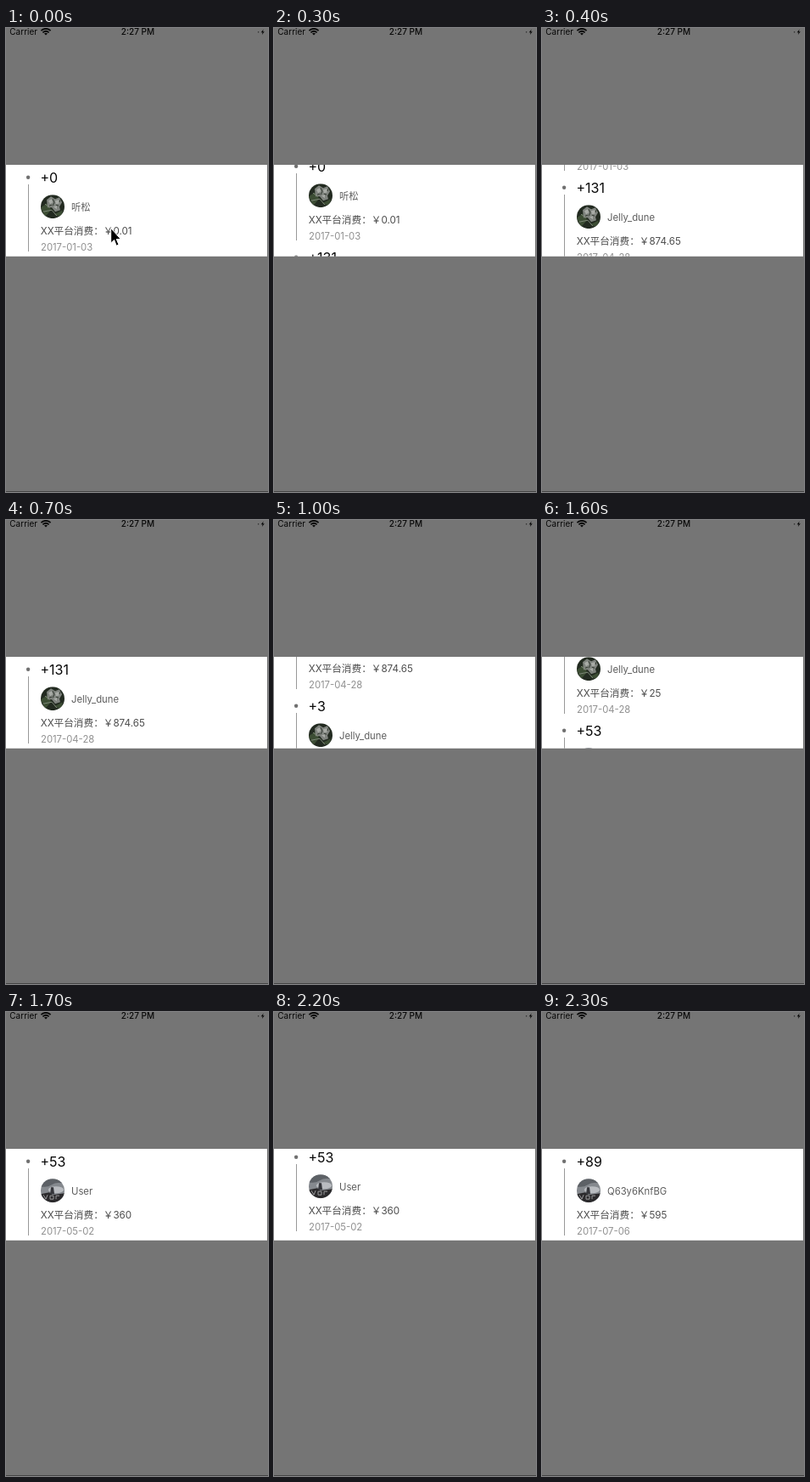
Animation, 309 px wide and 546 px high, one loop 2400 ms. Source, as an HTML page:

```html
<!DOCTYPE html>
<html lang="zh">
<head>
<meta charset="utf-8">
<title>Payment timeline</title>
<style>
  html, body { margin: 0; width: 100%; height: 100%; overflow: hidden; background: #757575; }
  svg { display: block; }
  text { font-family: Inter, "Noto Sans CJK SC", "Noto Sans CJK", sans-serif; white-space: pre; }
  .bar { font-size: 10px; fill: #080808; }
  .points { font-size: 16px; fill: #080808; }
  .name, .date { font-size: 11.3px; }
  .cost { font-size: 11.65px; fill: #4c4c4c; }
  .name { fill: #5c5c5c; }
  .date { fill: #909090; }
</style>
</head>
<body>
<svg width="100%" height="100%" viewBox="0 0 309 546">
  <defs>
    <clipPath id="round"><circle r="14"/></clipPath>
    <clipPath id="card"><rect y="161" width="308" height="107.75"/></clipPath>
    <g id="flower" clip-path="url(#round)">
      <rect x="-14" y="-14" width="28" height="28" fill="#222a20"/>
      <path d="M-14 1L-5-5L-2 4L-9 12ZM2 9L12 4L10 12Z" fill="#3c4d34"/>
      <path d="M-7-8L-2-12L3-9L8-11L11-5L8 0L9 4L3 6L-1 1L-6 1Z" fill="#7f837e"/>
      <path d="M-5-7L-1-9L0-5L-3-3ZM3-7L7-8L8-4L4-3ZM1 0L5-1L5 3Z" fill="#a9aca7"/>
      <path d="M-11 6L-1 4L5 11M-3 1L-9-3" stroke="#7d8778" fill="none"/>
      <path d="M0-9L2-5L0-1M4-2L7-1M-4-1L-1-2M9-8L8-5" stroke="#30372e" fill="none"/>
    </g>
    <g id="sky" clip-path="url(#round)">
      <rect x="-14" y="-14" width="28" height="28" fill="#85898e"/>
      <path d="M-14-14H14V-8Q5-11-1-7T-14-5Z" fill="#5d6166"/>
      <ellipse cx="4" cy="-1" rx="9" ry="4" fill="#b9bcc0"/>
      <path d="M-14 4L-4 2L0 5L14 3V14H-14Z" fill="#2b2a2c"/>
      <path d="M-2-4H1L2 4H-3Z" fill="#34353a"/>
      <path d="M-11 5L-8 10L-6 5M-3 6H1V10H-3ZM4 10V6H8" stroke="#9a9a9c" fill="none"/>
    </g>
  </defs>

  <rect width="309" height="546" fill="#757575"/>
  <text class="bar" x="4.3" y="8.3">Carrier</text>
  <g fill="none" stroke="#080808" stroke-width="1.7">
    <path d="M41.4 3.2Q47-1.6 52.6 3.2M43.4 5.3Q47 2.2 50.6 5.3"/>
    <path d="M45 6.5Q47 5.2 49 6.5L47 8.6Z" fill="#080808" stroke="none"/>
  </g>
  <text class="bar" x="155.5" y="8.3" text-anchor="middle" font-weight="500">2:27 PM</text>
  <rect x="297" y="4" width="1.2" height="1.5" fill="#333"/>
  <path d="M303.6 1.5L300.8 5.2H302.6L301.9 8L304.8 4.2H303Z" fill="#080808"/>

  <rect y="161" width="308" height="107.75" fill="#fff"/>
  <g clip-path="url(#card)"><g id="feed"></g></g>
  <rect y="545" width="309" height="1" fill="#444"/>

  <path id="cursor" d="M123.7 235.5V253L127.6 249.4L130.2 256.2L133 255L130.3 248.5H135.3Z"
        fill="#000" stroke="#fff" stroke-width="1" stroke-linejoin="round"/>
</svg>
<script>
const LOOP = 2400, PITCH = 107;
const items = [
  ["+0", "听松", "0.01", "2017-01-03", "flower"],
  ["+131", "Jelly_dune", "874.65", "2017-04-28", "flower"],
  ["+3", "Jelly_dune", "25", "2017-04-28", "flower"],
  ["+53", "User", "360", "2017-05-02", "sky"],
  ["+89", "Q63y6KnfBG", "595", "2017-07-06", "sky"]
];

// Scroll position in items, held from each time on.
const stops = [
  [0, 0], [300, 0.12], [400, 0.888], [500, 1],
  [1000, 1.6], [1100, 2],
  [1600, 2.327], [1700, 3],
  [2200, 3.05], [2300, 4]
];

const feed = document.getElementById("feed");
const cursor = document.getElementById("cursor");
const label = (kind, x, y, text) => `<text class="${kind}" x="${x}" y="${y}">${text}</text>`;

feed.innerHTML = items.map(([points, name, cost, date, photo], i) => `
  <g transform="translate(0 ${i * PITCH})">
    <circle cx="26.1" cy="175.8" r="2.2" fill="#707070"/>
    <rect x="26" y="184" width="1" height="79" fill="#999"/>
    ${label("points", 40.5, 181.7, points)}
    <use href="#${photo}" x="55" y="210.2"/>
    ${label("name", 77, 215, name)}
    ${label("cost", 40.7, 242.7, "XX平台消费：￥" + cost)}
    ${label("date", 41, 262.2, date)}
  </g>`).join("");

function draw(ms) {
  const t = ms % LOOP;
  const scroll = stops.filter(([at]) => at <= t).pop()[1];
  feed.setAttribute("transform", `translate(0 ${-Math.round(scroll * PITCH)})`);
  cursor.setAttribute("visibility", t < 100 ? "visible" : "hidden");
}

let start;
function tick(now) {
  start ??= now;
  draw(Math.max(0, now - start));
  requestAnimationFrame(tick);
}
draw(0);
requestAnimationFrame(tick);
</script>
</body>
</html>
```
